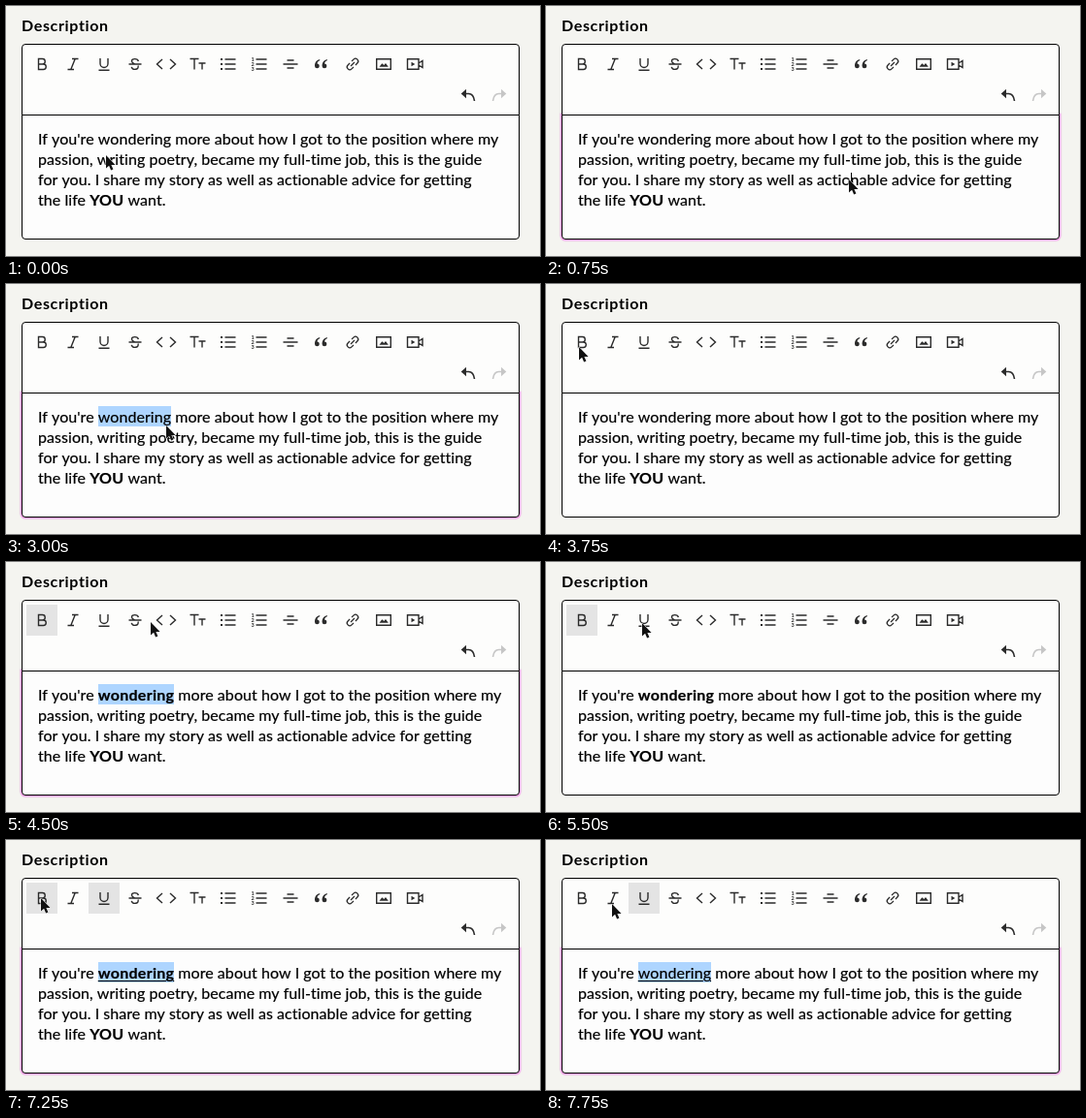
Write an HTML page that moves like this. It is 550 by 258 pixels and loops after 8 s.

```html
<!DOCTYPE html>
<html lang="en">
<head>
<meta charset="utf-8">
<title>Description editor</title>
<style>
  html, body { margin: 0; width: 100%; height: 100%; overflow: hidden; background: #f4f4f0; }
  body { position: relative; color: #000; letter-spacing: .06px;
    font: 16px/21px Lato, "Open Sans", sans-serif; font-variant-ligatures: none; }
  body > * { position: absolute; box-sizing: border-box; }
  #label { left: 16px; top: 9px; font-weight: 700; letter-spacing: .65px; }
  #body { left: 16px; top: 112px; width: 513px; height: 129px; background: #fdfdfd;
    border: 1px solid #000; border-radius: 0 0 4px 4px; }
  #body.focus { box-shadow: 0 0 1px 1.5px #f5a3ea; }
  #bar { left: 16px; top: 39px; width: 513px; height: 74px; background: #fdfdfc;
    border: 1px solid #000; border-radius: 4px 4px 0 0; }
  #text { left: 33px; top: 126px; -webkit-text-stroke: .2px #000; }
  .line { display: flex; gap: 4.1px; height: 21px; white-space: nowrap; }
  .bold { font-weight: 700; letter-spacing: .27px; }
  #word { background: linear-gradient(#aed5ff, #aed5ff) 0 0 / 0 100% no-repeat;
    text-decoration-thickness: 1px; text-underline-offset: 2px; }
  svg { left: 0; top: 0; }
</style>
</head>
<body>
<div id="label">Description</div>
<div id="body"></div>
<div id="bar"></div>
<div id="text"></div>
<svg width="550" height="258" viewBox="0 0 550 258">
  <g fill="#e4e4e4">
    <rect id="boldOn" x="21" y="44" width="32" height="32"/>
    <rect id="underOn" x="85" y="44" width="32" height="32"/>
  </g>
  <g id="icons" fill="none" stroke="#2b2b2b" stroke-width="1.4"></g>
  <rect id="caret" x="314" y="172" width="1" height="16" fill="#000"/>
  <path id="cursor" d="M0 0v13.5l3.1-2.8 2 4.8 2.3-1-2-4.6h4.2z"
    fill="#111" stroke="#fff" stroke-width="1" paint-order="stroke"/>
</svg>
<script>
const $ = id => document.getElementById(id);

const lines = [
  "If you're wondering more about how I got to the position where my",
  "passion, writing poetry, became my full-time job, this is the guide",
  "for you. I share my story as well as actionable advice for getting",
  "the life YOU want."
];
const wrap = w => w === "wondering" ? `<span id="word">${w}</span>`
  : w === "YOU" ? `<b class="bold">${w}</b>` : `<span>${w}</span>`;
$("text").innerHTML = lines
  .map(l => `<div class="line">${l.split(" ").map(wrap).join("")}</div>`).join("");

// Toolbar icons, each drawn around its own centre
const path = (d, attrs = "") => `<path d="${d}" ${attrs}/>`;
const solid = 'fill="#2b2b2b" stroke="none"';
const rows = "M-3.5-5h11M-3.5 0h11M-3.5 5h11";
const mark = "M-1.8-5C-5.5-4-7-1.5-7 2a2.4 2.4 0 1 0 2.6-2.5c0-1.8 1-2.7 2.6-3.3z";
const curve = "M-5-1.5h5.5q5 0 6 7.5";
const head = "M-7.3-1.5l5.3-4.7v9.4z";
const arrow = path(curve) + path(head, 'fill="context" stroke="none"');
const digits = [1, 2, 3].map(n =>
  `<text x="-8.5" y="${n * 5 - 8}" font-size="5.5" font-weight="700" ${solid}>${n}</text>`).join("");
const icons = [
  path("M-3.5-5.5h4a2.7 2.7 0 0 1 0 5.5h-4zM-3.5 0h5a2.75 2.75 0 0 1 0 5.5h-5z"),
  path("M-1-5.5h6.5M-5.5 5.5h6.5M2.2-5.5L-2.2 5.5"),
  path("M-4-6v5.5a4 4 0 0 0 8 0v-5.5M-5.5 6.3h11"),
  path("M3.4-3C2.8-6.2-3.7-6.2-3.5-3C-3.4-1-1-.6 0 0M3 1.5C4.5 6.2-3 6.5-3.7 2.8M-6.5 0h13"),
  path("M-4-5L-9.5 0l5.5 5M4-5l5.5 5-5.5 5"),
  path("M-7.5-5.5h9M-3-5.5v11M1.5-1h7M5-1v6.5"),
  path(rows) + path("M-8-5h2M-8 0h2M-8 5h2", 'stroke-width="1.8"'),
  path(rows) + digits,
  path("M-7.5 0h15M-3.5-4h7M-3.5 4h7"),
  path(mark, solid) + path(mark, solid + ' transform="translate(7.6)"'),
  path("M-1.5-3h-3a3 3 0 0 0 0 6h3M1.5-3h3a3 3 0 0 1 0 6h-3M-3 0h6", 'transform="rotate(-45) scale(.92)"'),
  path("M-7.3-5.3h14.6v10.6h-14.6z") + path("M-4.5 2.8l2.8-3.6 2 1.8 1.7-2 2.8 3.8z", solid),
  path("M-7.5-5.3h11.5v10.600h-11.5zM4-1l4-2.5v7l-4-2.5") + path("M-3.5-2.300l3.800 2.300-3.800 2.300z", solid)
];
const turn = (place, color) => `<g transform="${place}" stroke="${color}">` +
  path(curve, 'stroke-width="1.6"') + path(head, `fill="${color}" stroke="none"`) + "</g>";
$("icons").innerHTML =
  icons.map((d, i) => `<g transform="translate(${37 + 32 * i} 60)">${d}</g>`).join("") +
  turn("translate(476 92)", "#2b2b2b") +
  turn("translate(508 92) scale(-1 1)", "#c6c6c6");

// Pointer stops: [tick, x, y]
const stops = [
  [0, 103, 154], [2, 300, 177], [3, 312, 179], [5, 160, 154], [7, 90, 142], [8, 94, 141],
  [11, 162, 145], [12, 165, 146], [14, 60, 76], [15, 34, 65], [16, 34, 66], [18, 149, 62],
  [20, 110, 64], [22, 99, 63], [27, 99, 63], [28, 64, 18], [29, 36, 60], [30, 36, 66],
  [31, 68, 66], [32, 103, 154]
];
function pointer(tick) {
  const i = stops.findIndex(s => s[0] > tick);
  const [a, b] = [stops[i - 1], stops[i]];
  const k = (tick - a[0]) / (b[0] - a[0]);
  return [a[1] + (b[1] - a[1]) * k, a[2] + (b[2] - a[2]) * k];
}

const TICK = 250, TICKS = 32;
const blurTicks = [15, 22, 30];   // the editor loses focus while a button is pressed
const show = (id, on) => $(id).style.visibility = on ? "visible" : "hidden";

function draw() {
  const tick = Math.floor(performance.now() / TICK) % TICKS;
  const [x, y] = pointer(tick);
  const focus = tick >= 3 && !blurTicks.includes(tick);
  const bold = tick >= 16 && tick < 31;
  const under = tick >= 23;

  $("cursor").setAttribute("transform", `translate(${x.toFixed(1)} ${y.toFixed(1)})`);
  $("body").className = focus ? "focus" : "";
  show("caret", tick >= 3 && tick < 9 && (tick + 1) % 4 < 2);
  show("boldOn", bold);
  show("underOn", under);

  const word = $("word");
  word.className = bold ? "bold" : "";
  word.style.textDecorationLine = under ? "underline" : "none";
  const selected = !focus || tick < 9 ? "0px" : tick < 11 ? `${Math.round(x) - 95}px` : "100%";
  word.style.backgroundSize = `${selected} 100%`;
  requestAnimationFrame(draw);
}
draw();
</script>
</body>
</html>
```
